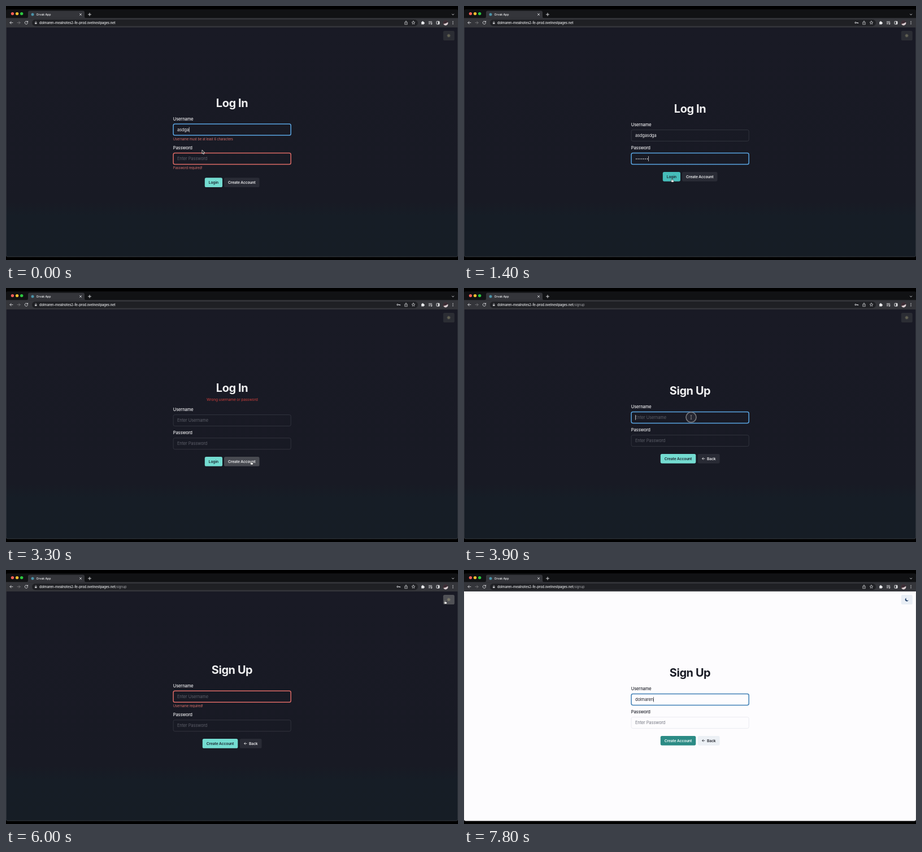
An HTML page for the animation above (8000 ms loop, 800 by 450 pixels).

```html
<!DOCTYPE html>
<html lang="en">
<head>
<meta charset="utf-8">
<title>Login form</title>
<style>
  html, body { margin: 0; width: 100%; height: 100%; overflow: hidden; background: #000; }
  svg { display: block; width: 800px; height: 450px; }
  text { font-family: Inter, Roboto, sans-serif; letter-spacing: -.02em; white-space: pre; }
</style>
</head>
<body>
<svg id="stage" viewBox="0 0 800 450" xmlns="http://www.w3.org/2000/svg">
  <defs>
    <linearGradient id="night" x1="0" y1="0" x2="0" y2="1">
      <stop offset="0" stop-color="#191a25"/>
      <stop offset=".76" stop-color="#181a24"/>
      <stop offset=".82" stop-color="#161d26"/>
      <stop offset="1" stop-color="#161d25"/>
    </linearGradient>
    <clipPath id="face"><circle cx="778" cy="30" r="4.4"/></clipPath>
  </defs>
  <rect width="800" height="450"/>
  <path d="M0 38V9a3 3 0 0 1 3-3H797a3 3 0 0 1 3 3V38z" fill="#111214"/>
  <g id="bar"></g>
  <g id="page"></g>
</svg>
<script>
const LOOP = 8000, STEP = 100;
const NAME = 'dolmaren', HOST = 'dolmaren-mealnotes2-fe-prod.ovelnestpages.net';
const LEFT = 295.8, WIDTH = 208.7, ROW = 10.3;

const THEMES = {
  dark: {
    page: 'url(#night)', edge: '#4a4c52', title: '#f0f0f1', text: '#ececee', hint: '#5c5e68',
    border: '#383a44', focus: '#5aa5e2', red: '#dc6a66', error: '#d9716c', alert: '#cf3f3b',
    main: '#74dcd1', mainHover: '#46bdba', mainText: '#1a2530',
    side: '#292b35', sideHover: '#484a51', sideText: '#ececee',
    toggle: '#2b2d34', toggleHover: '#505156', icon: '#d5cf96'
  },
  light: {
    page: '#fdfcfe', edge: '#c9c9cc', title: '#191b25', text: '#23252e', hint: '#767983',
    border: '#e6e8ee', focus: '#3f7fb5', red: '#dc4a45', error: '#da4b47', alert: '#da4b47',
    main: '#2c8b85', mainHover: '#276f6c', mainText: '#f4fbfa',
    side: '#ecf0f5', sideHover: '#dfe5ee', sideText: '#23252e',
    toggle: '#e9eef5', toggleHover: '#d3deec', icon: '#1d3b66'
  }
};

// pointer path: time, x, y
const PATH = [
  [0, 347, 255], [1100, 347, 255], [1400, 368, 306], [2300, 368, 306], [2900, 434, 307],
  [3500, 434, 307], [3800, 402, 229], [3900, 402, 229], [4300, 711, 69], [4800, 711, 69],
  [5400, 779, 55], [6000, 777, 54], [6100, 773, 59.5], [6600, 400, 224], [8000, 400, 224]
];
const CLICKS = [1500, 3300 + STEP, 3800, 4400, 6700];

const $ = id => document.getElementById(id);
const during = (t, a, b) => t >= a && t < b;

function label(x, y, str, size, fill, weight = 400, extra = '') {
  return `<text x="${x}" y="${y + size * .36}" font-size="${size}" font-weight="${weight}" fill="${fill}" ${extra}>${str}</text>`;
}
const middle = 'text-anchor="middle"';

function box(x, y, w, h, r, fill, extra = '') {
  return `<rect x="${x}" y="${y}" width="${w}" height="${h}" rx="${r}" fill="${fill}" ${extra}/>`;
}

function line(d, color = '#d3d4d7', width = .9) {
  return `<path d="${d}" fill="none" stroke="${color}" stroke-width="${width}" stroke-linecap="round" stroke-linejoin="round"/>`;
}

function dot(x, y, r, fill, extra = '') {
  return `<circle cx="${x}" cy="${y}" r="${r}" fill="${fill}" ${extra}/>`;
}

function star(x, y) {
  const points = Array.from({ length: 10 }, (_, i) => {
    const r = i % 2 ? 1.4 : 3.1, a = i * Math.PI / 5;
    return `${x + r * Math.sin(a)} ${y - r * Math.cos(a)}`;
  });
  return line(`M${points.join('L')}z`, '#d3d4d7', .7);
}

function browserBar(s) {
  const white = '#e9eaec';
  let out = dot(11.5, 13.6, 2.7, '#f35f57') + dot(19.6, 13.6, 2.7, '#f6bd2f') + dot(27.7, 13.6, 2.7, '#2cc840');
  out += '<path d="M36 21.5q3 0 3-3V11.500q0-3 3-3H136q3 0 3 3V18.500q0 3 3 3z" fill="#34353a"/>';
  out += box(0, 21.3, 800, 16.7, 0, '#34353a') + box(46, 24, 683, 11.400, 5.7, '#1f2024');
  out += dot(47, 15, 2.5, '#4b93a8') + label(53.5, 15, 'Orvak App', 5.3, white, 500);
  out += line('M130.400 13.400l3.200 3.200m0-3.200l-3.200 3.200') + line('M145.500 15h5m-2.500-2.500v5', white);
  out += line('M789.400 14.300l1.700 1.600 1.700-1.600');
  out += line('M12 29.600H7m2.200-2.300L6.900 29.600l2.300 2.300');
  out += line('M20 29.600h5m-2.200-2.300l2.300 2.300-2.300 2.300', '#75767a');
  out += line('M38.300 28.200a2.700 2.700 0 1 0 .3 2M38.600 26.700v1.800h-1.800');
  out += box(51, 29.2, 3.6, 2.9, .5, '#b5b6b9') + line('M51.800 29v-.8a1 1 0 0 1 2 0v.8', '#b5b6b9', .6);
  out += label(59, 29.6, HOST + (s.signup ? '<tspan fill="#a0a1a5" font-weight="400">/signup</tspan>' : ''), 5.9, white, 500);
  if (s.key) out += dot(693, 29.6, 1.2, 'none', 'stroke="#d3d4d7" stroke-width=".9"') + line('M694.400 29.600h3.300v1.100M696.200 29.600v1');
  out += line('M706.700 28.800h-1v3.900h4.600v-3.900h-1M708 31v-4.300m-1.300 1.200l1.300-1.300 1.300 1.300', '#d3d4d7', .7) + star(721, 29.7);
  out += box(735.2, 28, 4.700, 4.500, .6, white) + dot(737.5, 27.8, 1, white) + dot(740, 30.3, 1, white);
  out += line('M748.300 27.600h5.400M748.300 29.600h5.400M748.300 31.600h2.500M753.700 29.600v2.300') + dot(753, 32, .9, '#d3d4d7');
  out += box(762, 27.2, 5, 5, .6, 'none', 'stroke="#e9eaec" stroke-width=".9"') + box(764.8, 27.2, 2.2, 5, 0, white);
  out += dot(778, 30, 4.4, '#5b4145')
    + '<g clip-path="url(#face)"><path d="M773 33l4-2 6-3v7h-10z" fill="#d8cdd0"/><path d="M773 25h10v3l-5 3-5-1z" fill="#3b2c34"/></g>';
  for (let i = 0; i < 3; i++) out += dot(791, 27.5 + i * 2.1, .7, white);
  return out;
}

function pointerAt(t) {
  const i = Math.max(1, PATH.findIndex(p => p[0] > t));
  const [t0, x0, y0] = PATH[i - 1], [t1, x1, y1] = PATH[i];
  const k = (t - t0) / (t1 - t0), e = k * k * (3 - 2 * k);
  return { x: x0 + (x1 - x0) * e, y: y0 + (y1 - y0) * e };
}

function stateAt(t) {
  const s = { t, signup: t >= 3500, light: t >= 6100, key: during(t, 700, 7300), wrong: during(t, 2100, 3500) };
  s.user = t < 2100 ? 'asdgasdga'.slice(0, 5 + t / STEP)
    : NAME.slice(0, Math.max(0, (t - 7000) / STEP));
  s.dots = t < 2100 ? Math.min(7, Math.max(0, (t - 600) / STEP)) : 0;
  s.focus = t < 500 || during(t, 3800, 4500) || t >= 6700 ? 'user' : during(t, 500, 1500) ? 'pass' : '';
  const problem = (field, n) => n >= 6 ? '' : n ? `${field} must be at least 6 characters` : `${field} required!`;
  s.userError = t < 2100 || t >= 4400 ? problem('Username', s.user.length) : '';
  s.passError = t < 2100 ? problem('Password', s.dots) : '';
  s.pointer = pointerAt(t);
  s.typing = t >= 7100;
  return s;
}

function layout(s) {
  const rows = [s.wrong, s.userError, s.passError].filter(Boolean).length;
  const title = 181.8 - rows * ROW / 2;
  const user = title + 47.6 + (s.wrong ? ROW : 0);
  const pass = user + 41.2 + (s.userError ? ROW : 0);
  return { title, user, pass, buttons: pass + 31.7 + (s.passError ? ROW : 0) };
}

function field(s, c, id, y, error) {
  const name = id === 'user' ? 'Username' : 'Password';
  const focused = s.focus === id, x = 303;
  const stroke = focused ? c.focus : error ? c.red : c.border;
  const width = focused || error ? 1.5 : .8;
  let out = label(LEFT, y - 19.1, name, 7.5, c.text, 500);
  out += box(LEFT + .3, y - 10, WIDTH - .6, 20, 2.8, 'none', `stroke="${stroke}" stroke-width="${width}"`);
  const filled = id === 'user' ? s.user : s.dots;
  if (!filled) out += label(x, y, 'Enter ' + name, 7.5, c.hint);
  else if (id === 'user') out += label(x, y, s.user, 7.5, c.text, 400, 'id="typed"');
  else for (let i = 0; i < s.dots; i++) out += dot(x + 1.9 + i * 3.3, y + .2, .85, c.text);
  if (focused) out += box(x + (id === 'pass' ? s.dots * 3.3 : 0), y - 4.5, .7, 9, 0, c.text, 'id="caret"');
  if (error) out += label(LEFT, y + 16.8, error, 5.8, c.error, 400, 'style="letter-spacing:-.015em"');
  return out;
}

function pointer(kind, x, y) {
  const shapes = {
    arrow: '<path d="M0 0V6.600L1.500 5.300 2.500 7.600 3.600 7.100 2.600 4.900H4.700z" fill="#111" stroke="#fff" stroke-width=".7"/>',
    hand: '<path d="M-.7 .5q.7-1 1.300 0V2.400l2.300.5q.6.200.500.9L2.900 6H-.4L-2.200 3.800q0-1 .9-.6l.6.500z" fill="#fff" stroke="#222" stroke-width=".5"/>',
    beam: '<path d="M-1.200-3.500Q0-3.500 0-2.700V2.700Q0 3.500-1.200 3.500M1.200-3.500Q0-3.500 0-2.700M0 2.700Q0 3.500 1.200 3.500" fill="none" stroke="#aaa" stroke-width=".7"/>'
  };
  return `<g transform="translate(${x} ${y})">${shapes[kind]}</g>`;
}

function toggleIcon(s, c) {
  if (s.light) return `<path d="M783 49.400a3.100 3.100 0 1 0 3.700 3.900 2.700 2.700 0 0 1-3.700-3.900z" fill="${c.icon}"/>`;
  let out = dot(783.6, 52.5, 1.3, 'none', `stroke="${c.icon}" stroke-width=".6"`);
  for (let i = 0; i < 8; i++) out += `<path d="M783.600 49.600v.8" stroke="${c.icon}" stroke-width=".6" transform="rotate(${i * 45} 783.600 52.500)"/>`;
  return out;
}

function page(s) {
  const c = s.light ? THEMES.light : THEMES.dark;
  const at = layout(s), { x, y } = s.pointer;
  const over = (bx, by, w, h) => !s.typing && x > bx - 2 && x < bx + w + 2 && y > by - 2 && y < by + h + 2;
  let kind = 'arrow';

  function button(bx, w, str, tone) {
    const top = at.buttons - 8.4, hover = over(bx, top, w, 16.8);
    if (hover) kind = 'hand';
    const back = str === 'Back', ink = c[tone + 'Text'];
    let out = box(bx, top, w, 16.8, 2.6, c[tone + (hover ? 'Hover' : '')]);
    if (back) out += line(`M426 ${at.buttons}h-4.300m1.800-1.900l-1.900 1.900 1.900 1.900`, ink, .8);
    return out + label(back ? 437.8 : bx + w / 2, at.buttons, str, 6.7, ink, 600, middle);
  }

  let out = `<path d="M0 38H800V441.500a3 3 0 0 1-3 3H3a3 3 0 0 1-3-3z" fill="${c.page}"/>`;
  out += line('M.3 38V441.500a2.700 2.700 0 0 0 2.700 2.700H797a2.700 2.700 0 0 0 2.700-2.700V38', c.edge, .6);
  const onToggle = over(774, 44, 20, 17);
  if (onToggle) kind = 'hand';
  out += box(773.8, 44, 20, 17, 2.6, onToggle ? c.toggleHover : c.toggle) + toggleIcon(s, c);
  out += label(400, at.title, s.signup ? 'Sign Up' : 'Log In', 19.9, c.title, 700, middle);
  if (s.wrong) out += label(400.3, at.title + 21.4, 'Wrong username or password', 6.6, c.alert, 400, middle);
  out += field(s, c, 'user', at.user, s.userError) + field(s, c, 'pass', at.pass, s.passError);
  out += s.signup
    ? button(347.8, 62.5, 'Create Account', 'main') + button(413.8, 38.8, 'Back', 'side')
    : button(351.8, 31.2, 'Login', 'main') + button(386, 62.5, 'Create Account', 'side');
  for (const fy of [at.user, at.pass]) if (over(LEFT, fy - 8, WIDTH, 16)) kind = 'beam';

  if (CLICKS.some(k => during(s.t, k, k + 2 * STEP))) {
    out += dot(x, y, 9, 'rgba(140,140,145,.12)', 'stroke="#77787d" stroke-width="1.6"');
  }
  return s.typing ? out : out + pointer(kind, x, y);
}

let shown = -1;
function draw(now) {
  const t = Math.floor((now % LOOP) / STEP) * STEP;
  if (t !== shown) {
    shown = t;
    const s = stateAt(t);
    $('bar').innerHTML = browserBar(s);
    $('page').innerHTML = page(s);
    if (s.focus === 'user' && s.user) $('caret').setAttribute('x', 303 + $('typed').getComputedTextLength());
  }
}

const start = performance.now();
function tick() {
  draw(performance.now() - start);
  requestAnimationFrame(tick);
}
tick();
</script>
</body>
</html>
```
